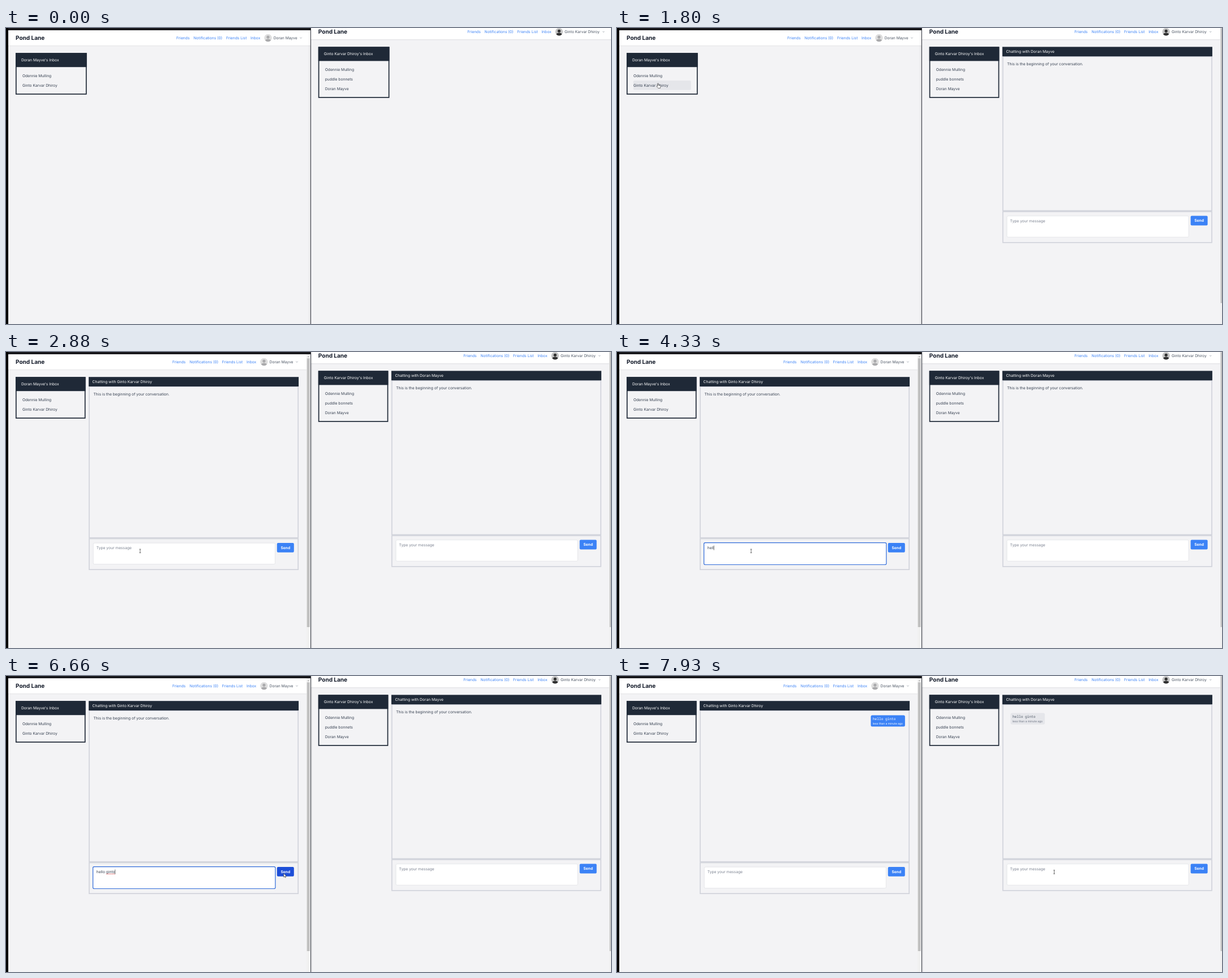
An HTML page for the animation above (8 s loop, 1069 by 524 pixels).

```html
<!DOCTYPE html>
<html lang="en">
<head>
<meta charset="utf-8">
<title>Two inboxes</title>
<style>
html, body { margin: 0; width: 100%; height: 100%; overflow: hidden; background: #000; }
svg { display: block; width: 1069px; height: 524px; font: 6.7px Inter, sans-serif; text-rendering: geometricPrecision; }
text { white-space: pre; }
</style>
</head>
<body>
<svg id="stage" viewBox="0 0 1069 524"></svg>
<script>
const LOOP = 8000, PAGE = '#f3f3f5', DARK = '#1f2937', INK = '#374151', MUTED = '#6b7280',
  BLUE = '#3b82f6', LINE = '#d1d3db', HOVER = '#e5e6ea';
const MESSAGE = 'hello ginto';
const KEY_TIMES = [3870, 4000, 4200, 4330, 4530, 4800, 5000, 5130, 5270, 5460, 5540];
const FOCUS = 3000, BLUR = 6860, SENT = 6930, SETTLED = 7130, BLINK = 470;

// Pointer path: time, x, y
const PATH = [
  [190, 1028, 518], [800, 577, 118], [920, 587.5, 110.5], [1400, 587.5, 110.5],
  [1800, 72.5, 97.8], [2330, 72.5, 97.8], [2880, 237, 352.3], [6060, 237, 352.3],
  [6600, 490.7, 349.5], [7330, 490.7, 349.5], [7720, 796, 356], [7930, 772.5, 347]
];

const LEFT = { x: 0, y: 0, grow: 0, navX: 0, me: 'Doran Mayve', peer: 'Ginto Karvar Dhiroy',
  list: ['Odennie Mulling', 'Ginto Karvar Dhiroy'], disc: '#dedede', figure: '#aaaaac' };
const RIGHT = { x: 534.8, y: -10.8, grow: 5.4, navX: -20.5, me: 'Ginto Karvar Dhiroy', peer: 'Doran Mayve',
  list: ['Odennie Mulling', 'puddle bonnets', 'Doran Mayve'], disc: '#c4c4c4', figure: '#303030' };

const stage = document.getElementById('stage');
const ruler = document.createElement('canvas').getContext('2d');
const widthOf = s => {
  ruler.font = '100px Inter, sans-serif';
  return ruler.measureText(s).width * 0.067;
};

const rect = (x, y, w, h, fill, r = 0, more = '') =>
  `<rect x="${x}" y="${y}" width="${w}" height="${h}" fill="${fill}" rx="${r}" ${more}/>`;
const text = (x, y, s, fill = INK, more = '') => `<text x="${x}" y="${y}" fill="${fill}" ${more}>${s}</text>`;
const path = (d, stroke, width, fill = 'none') =>
  `<path d="${d}" fill="${fill}" stroke="${stroke}" stroke-width="${width}" stroke-linejoin="round"/>`;
const group = (x, y, body) => `<g transform="translate(${x} ${y})">${body}</g>`;

function navBar(win, shift) {
  const links = [[301, 'Friends'], [331.3, 'Notifications (0)'], [388.9, 'Friends List'], [432, 'Inbox']];
  const avatar = `<circle r="6.7" fill="${win.disc}"/><circle cy="-1.4" r="2.6" fill="${win.figure}"/>` +
    path('M-5 4.46A6.7 6.7 0 0 0 5 4.46Q4 1.9 0 1.9T-5 4.46', 'none', 0, win.figure);
  return rect(4, 30.8, 534.2, .7, '#dcdce0') + rect(4, 31.5, 534.2, .8, '#e9e9ec') +
    rect(4, 4, 534.2, 26.8, '#fff') +
    text(17, 21, 'Pond Lane', '#111827', 'font-size="10.05" font-weight="700"') +
    group(shift + win.navX, 0,
      links.map(([x, s]) => text(x, 20.1, s, BLUE)).join('') +
      group(463, 17.5, avatar) + text(472.7, 20.1, win.me, '#4b5563')) +
    group(shift, 0, path('M519.4 16.7l1.6 1.6 1.6-1.6', MUTED, .6));
}

function inbox(win, state) {
  const w = state.chat ? 123.6 : 125.7, h = 40.2 + 16.75 * win.list.length;
  const rows = win.list.map((name, i) => {
    const y = 76.2 + 16.75 * i;
    return (i === state.hoverRow ? rect(28.9, y, w - 23.8, 16.75, HOVER, 2) : '') + text(28.9, y + 10.8, name);
  });
  return rect(17.8, 45, w - 1.7, h - 1.7, 'none', 0, `stroke="${DARK}" stroke-width="1.7"`) +
    rect(17, 44.2, w, 25, DARK) + text(27, 58.6, win.me + "'s Inbox", '#fff') + rows.join('');
}

function bubble(x, y, fill, ink, sub) {
  return rect(x, y, 60.4, 20.2, fill, 2.5) +
    text(x + 3.4, y + 8.8, MESSAGE, ink, 'font-size="6.15" font-family="Noto Sans Mono, monospace"') +
    text(x + 3.4, y + 16.7, 'less than a minute ago', sub, 'font-size="5.02"');
}

function textArea(state) {
  const { typed, focus, caret, squiggle } = state;
  const box = focus
    ? rect(153.6, 337.6, 322.3, 38.9, '#fff', 2.2, 'stroke="#2f6ad9" stroke-width="1.2"')
    : rect(154.2, 338.2, 321.2, 37.4, '#fff', 2, 'stroke="#d9dbe0" stroke-width=".6"');
  const label = typed ? text(159.8, 349.4, typed) : text(159.8, 349.4, 'Type your message', '#7b8290');
  const bar = caret ? rect(159.7 + widthOf(typed), 342.6, .6, 8.2, '#111') : '';
  const start = 159.8 + widthOf('hello ');
  const wave = squiggle ? path(`M${start} 351` + 'l.8-.9.8.9'.repeat(10), '#dc3a3a', .6) : '';
  return box + label + wave + bar;
}

function chat(win, state) {
  const edge = `stroke="${LINE}" stroke-width="1.7"`, split = 329.6 + win.grow;
  let log = text(154.5, 77, 'This is the beginning of your conversation.');
  if (state.bubble === 'in') log = bubble(160.7, 76.3, HOVER, '#4b5563', MUTED);
  if (state.bubble === 'out') log = bubble(448.5, 69.4, BLUE, '#fff', '#fff');
  const form = rect(147, 330.5, 369.2, 54.7, 'none', 0, edge) + textArea(state) +
    rect(478.8, 338, 30, 16.8, state.sendHover ? '#1d4ed8' : BLUE, 2) +
    text(493.8, 348.9, 'Send', '#fff', 'font-weight="700" text-anchor="middle"');
  return rect(147, 61.4, 369.2, split - 62.2, 'none', 0, edge) +
    rect(146.1, 44.2, 371, 16.8, DARK) + text(152.6, 55.1, 'Chatting with ' + win.peer, '#fff') +
    log + group(0, win.grow, form);
}

function scrollBar(win, state) {
  return rect(530.9, 4, 7.3, 540, '#f1f1f1') +
    path('M532.8 8.9l1.5-1.7 1.5 1.7z', 'none', 0, '#a3a3a3') +
    rect(531.7, 11.2, 5, 475.8 - win.y, state.barHover ? '#a8a8a8' : '#c1c1c1');
}

const browser = (win, state) => group(win.x, win.y,
  rect(4, 4, 534.2, 540, PAGE) + navBar(win, state.chat ? -7.1 : 0) + inbox(win, state) +
  (state.chat ? chat(win, state) + scrollBar(win, state) : ''));

function pointerAt(t) {
  const next = PATH.findIndex(p => p[0] > t);
  if (next === 0) return null;
  if (next < 0) return PATH[PATH.length - 1].slice(1);
  const [t0, x0, y0] = PATH[next - 1], [t1, x1, y1] = PATH[next];
  const u = (t - t0) / (t1 - t0), k = u * u * (3 - 2 * u);
  return [x0 + (x1 - x0) * k, y0 + (y1 - y0) * k];
}

const CURSORS = {
  arrow: path('M0 0v6.6l1.6-1.5 1.1 2.4 1-.4-1-2.3h2.1z', '#222', .6, '#fff'),
  hand: path('M-.8 5V.8a.8.8 0 0 1 1.6 0v2.6l2.8.7q1 .3.9 1.3L4 8.7H.2L-2.7 5.5q.3-1 1.9-.2z', '#222', .6, '#fff'),
  beam: path('M-1.4-3.2h2.8M0-3.2v6.4M-1.4 3.2h2.8', '#333', .7)
};

function draw(t) {
  const pos = pointerAt(t), [px, py] = pos || [-99, -99];
  const within = (x0, y0, x1, y1) => px > x0 && px < x1 && py > y0 && py < y1;
  const leftChat = t >= 2130, rightChat = t >= 1330;
  const typedCount = t < SETTLED ? KEY_TIMES.filter(k => k <= t).length : 0;
  const lastKey = typedCount ? KEY_TIMES[typedCount - 1] : FOCUS;
  const focus = t >= FOCUS && t < BLUR;
  const overRight = t >= 1060 && within(563, 98, 666, 116), overLeft = within(29, 93, 131, 110);

  const left = {
    chat: leftChat, hoverRow: overLeft ? 1 : -1, focus,
    typed: MESSAGE.slice(0, typedCount),
    caret: focus && (t - lastKey) % (2 * BLINK) < BLINK,
    squiggle: t >= 6060 && t < SETTLED,
    sendHover: within(478.8, 338, 508.8, 355),
    barHover: within(531, 11, 538, 487),
    bubble: t >= SETTLED ? 'out' : t >= SENT ? 'in' : ''
  };
  const right = { chat: rightChat, hoverRow: overRight ? 2 : -1, typed: '', bubble: t >= SENT ? 'in' : '' };

  const typing = leftChat && within(154, 338, 476, 376) || rightChat && within(689, 333, 1010, 370);
  const shape = overLeft || overRight ? 'hand' : typing ? 'beam' : 'arrow';
  const shade = [0, 1, 2].map(i =>
    rect(t >= 2070 ? 538.8 + i : 537 - i, 0, 1, 524, '#000', 0, `opacity="${.09 - .03 * i}"`)).join('');

  stage.innerHTML = rect(0, 0, 1069, 524, '#000') + browser(LEFT, left) +
    rect(4, 0, 534, 4, '#17171b') + browser(RIGHT, right) + shade +
    rect(538, 0, .9, 524, '#30343f') + (pos ? group(px, py, CURSORS[shape]) : '');
}

const begin = performance.now();
function tick() {
  draw((performance.now() - begin) % LOOP);
  requestAnimationFrame(tick);
}
tick();
</script>
</body>
</html>
```
